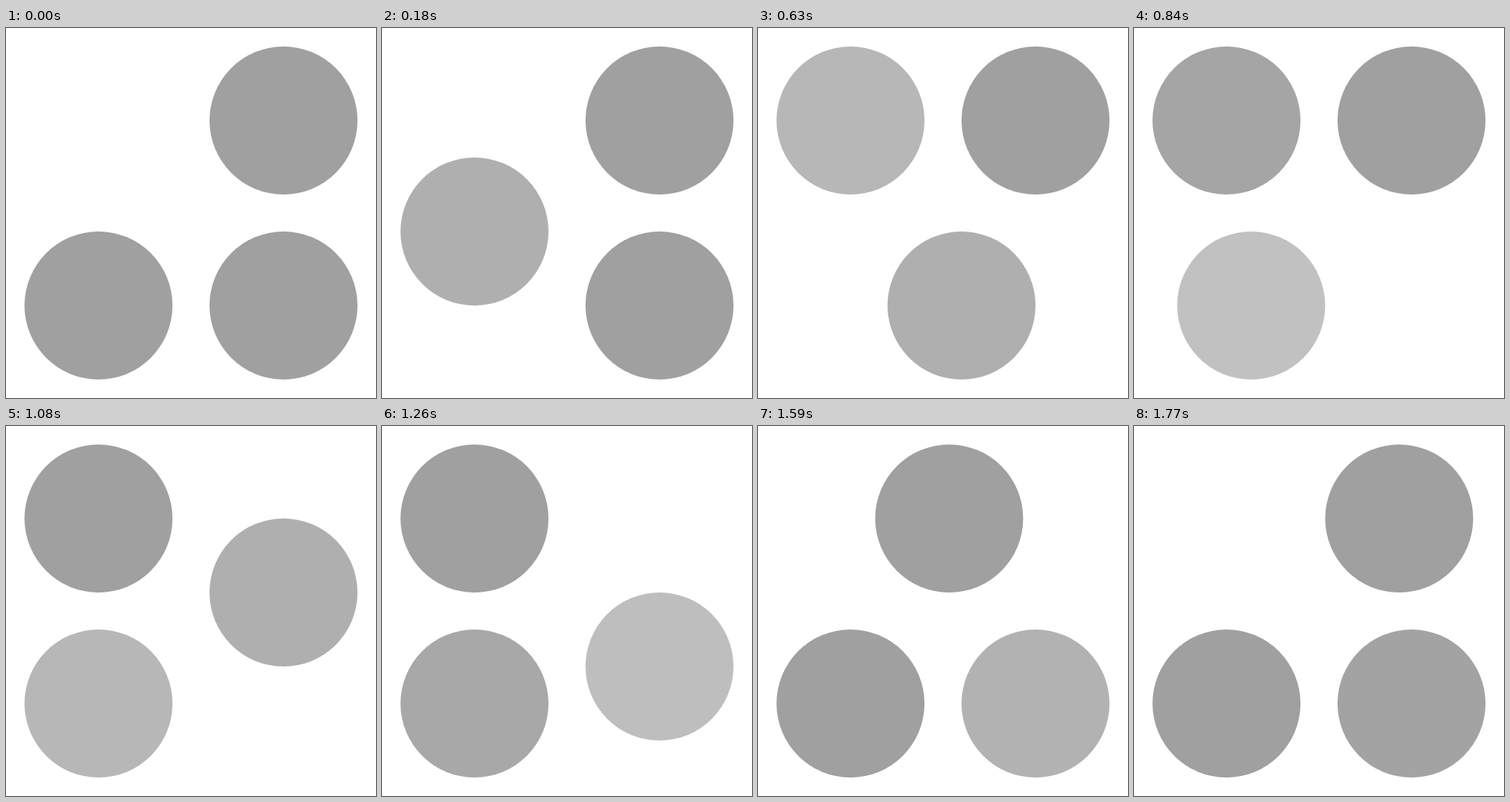
Recreate the animation shown at these times as an HTML page. Size 500 px wide and 500 px high, loop 1800 ms.

```html
<!DOCTYPE html>
<html lang="en">
<head>
<meta charset="utf-8">
<title>Sliding circles</title>
<style>
  html, body { margin: 0; height: 100%; overflow: hidden; background: #fff; }
  svg { display: block; width: 100%; height: 100%; }
</style>
</head>
<body>
<svg viewBox="0 0 500 500">
  <circle r="100"/>
  <circle r="100"/>
  <circle r="100"/>
</svg>
<script>
const LOOP = 1800, STEP = 30, MOVE = 450;
const NEAR = 125, FAR = 375, BASE = 160, PEAK = 198;
const [first, second, third] = document.querySelectorAll('circle');

const clamp = v => Math.min(1, Math.max(0, v));
const mix = (a, b, p) => a + (b - a) * p;

function place(circle, x, y, start, t) {
  // Brightens during its move, then darkens for the same time.
  const glow = clamp(1 - Math.abs(t - start - MOVE) / MOVE);
  const grey = Math.round(mix(BASE, PEAK, glow));
  circle.setAttribute('cx', x);
  circle.setAttribute('cy', y);
  circle.setAttribute('fill', `rgb(${grey},${grey},${grey})`);
}

function draw() {
  // The motion advances in fixed steps; 1 ms absorbs timer rounding.
  const t = Math.floor((performance.now() + 1) / STEP) * STEP % LOOP;
  const slide = (from, to, turn) => mix(from, to, clamp(t / MOVE - turn));
  place(first, slide(NEAR, FAR, 3), slide(FAR, NEAR, 0), 0, t);
  place(second, slide(FAR, NEAR, 1), FAR, MOVE, t);
  place(third, FAR, slide(NEAR, FAR, 2), 2 * MOVE, t);
  requestAnimationFrame(draw);
}
draw();
</script>
</body>
</html>
```
